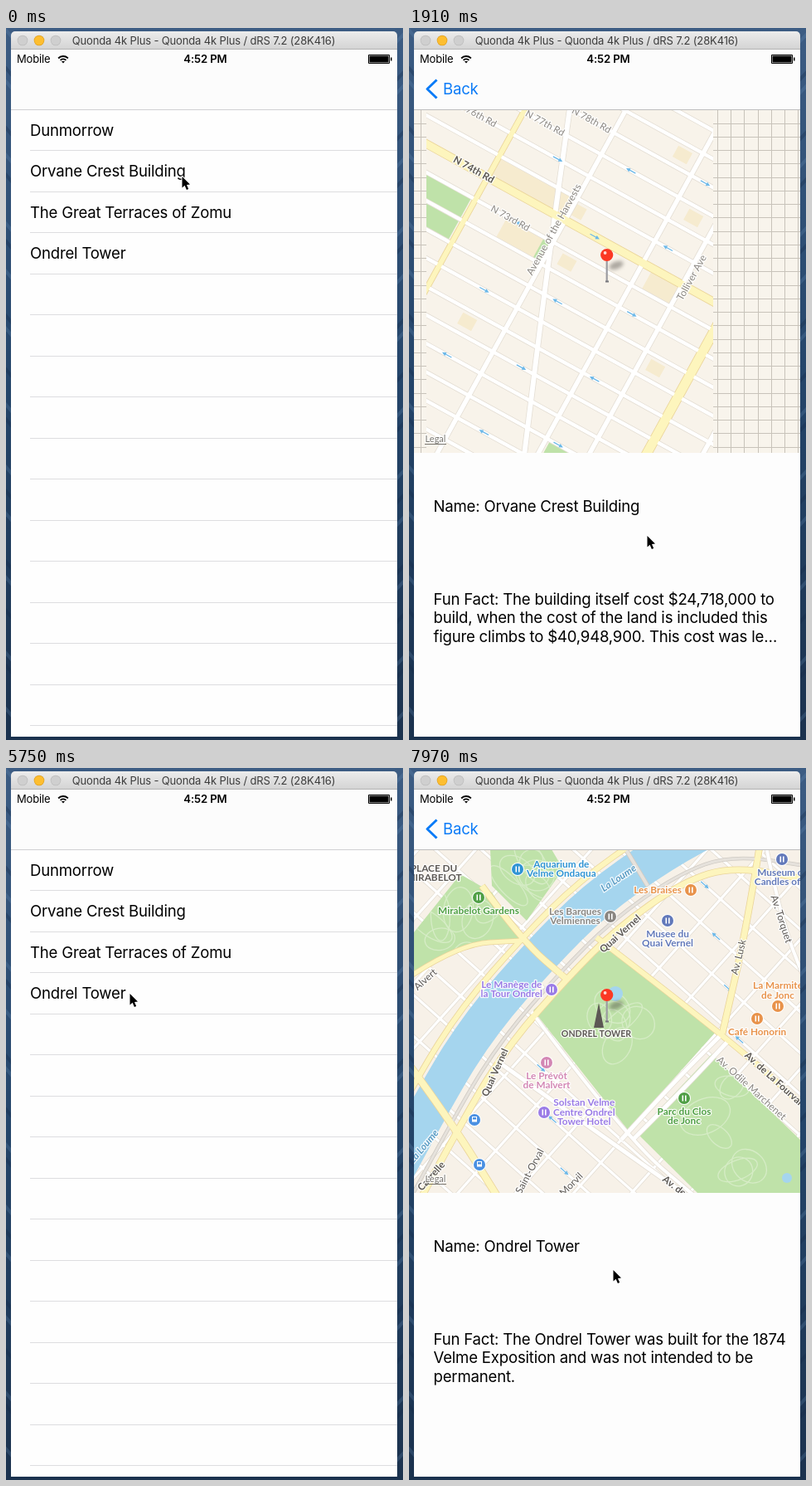
These frames come from a looping animation (479x858 px, 8 s). An HTML page with a canvas:

```html
<!DOCTYPE html>
<html lang="en">
<head>
<meta charset="utf-8">
<title>Places app</title>
<style>
html, body { margin: 0; width: 100%; height: 100%; overflow: hidden; background: #24405f; }
canvas { display: block; }
</style>
</head>
<body>
<canvas id="stage" width="479" height="858"></canvas>
<script>
const c = document.getElementById('stage').getContext('2d');
const LOOP = 8000, STEP = 147;
const L = 6, R = 472, W = R - L, NAV = 98, MAP_END = 512, BOTTOM = 854, ROW = 49.5;
const BLUE = '#0b7bf7', GREEN = '#bfe2a9', TAN = '#f6ebcf', DARK = '#5c5854', GRAY = '#8a8681';
const FOOD = '#e8924a', SHOP = '#e2a021', BAR = '#b672cf', HOTEL = '#9a7be6', MUSEUM = '#6279ba', PARK = '#4f9f45';

// start: step at which the first map tile arrives, pace: how slowly the rest follow
const places = [
  { name: 'Orvane Crest Building', grid: 16.25, draw: cityMap, start: 9, pace: 1,
    fact: ['The building itself cost $24,718,000 to', 'build, when the cost of the land is included this',
      'figure climbs to $40,948,900. This cost was le…'] },
  { name: 'Ondrel Tower', grid: 14.1, draw: riverMap, start: 48, pace: 0.3,
    fact: ['The Ondrel Tower was built for the 1874', 'Velme Exposition and was not intended to be', 'permanent.'] }
];
const rows = ['Dunmorrow', places[0].name, 'The Great Terraces of Zomu', places[1].name];

// ---------- drawing helpers ----------
let seed = 1;
const rand = (from, to) => {
  seed = seed * 16807 % 2147483647;
  return from + (to - from) * seed / 2147483647;
};

const rect = (color, x, y, w, h) => { c.fillStyle = color; c.fillRect(x, y, w, h); };

function circle(color, x, y, r) {
  c.fillStyle = color;
  c.beginPath();
  c.arc(x, y, r, 0, 7);
  c.fill();
}

function trace(p, smooth) {
  c.beginPath();
  c.moveTo(...p[0]);
  p.slice(1).forEach(([x, y], i) => {
    const next = p[i + 2];
    if (smooth && next) c.quadraticCurveTo(x, y, (x + next[0]) / 2, (y + next[1]) / 2);
    else c.lineTo(x, y);
  });
}

function poly(color, p) {
  trace(p);
  c.fillStyle = color;
  c.fill();
}

function line(color, width, p, smooth) {
  trace(p, smooth);
  c.strokeStyle = color;
  c.lineWidth = width;
  c.stroke();
}

const roadStyles = { white: ['#e4ded4', '#ffffff'], yellow: ['#ead49a', '#fdf5bd'], gray: ['#cfcac3', '#e6e2dc'] };
function roads(list) {
  for (const pass of [0, 1])
    for (const [kind, width, p] of list) line(roadStyles[kind][pass], width + (pass ? 0 : 1.6), p, true);
}

function ui(s, x, y, size = 18.6, color = '#000', align = 'left', weight = 400) {
  c.font = `${weight} ${size}px Inter, Roboto, sans-serif`;
  c.letterSpacing = `${-size * 0.011}px`;
  c.textAlign = align;
  c.fillStyle = color;
  c.fillText(s, x, y);
}

// Draws a haloed map label centred on a point and returns nothing.
function label(s, x, y, color = GRAY, angle = 0, font = '700 11.8px') {
  c.save();
  c.translate(x, y);
  c.rotate(angle * Math.PI / 180);
  c.font = font + ' Lato, "Open Sans", sans-serif';
  c.letterSpacing = '0px';
  c.textAlign = 'center';
  c.textBaseline = 'middle';
  c.strokeStyle = 'rgba(255,255,255,.85)';
  c.lineWidth = 2.6;
  c.strokeText(s, 0, 0);
  c.fillStyle = color;
  c.fillText(s, 0, 0);
  c.restore();
}

// A round badge with its name on one side of it.
function poi(color, s, x, y, side = 'below', glyph = true) {
  const lines = s.split('|'), n = lines.length, gap = 11.7;
  if (glyph) {
    circle('#fff', x, y, 8);
    circle(color, x, y, 7);
    rect('#fff', x - 2.5, y - 3.5, 1.6, 7);
    rect('#fff', x + 1, y - 3.5, 1.6, 7);
  }
  c.font = '700 11.8px Lato, "Open Sans", sans-serif';
  c.letterSpacing = '0px';
  const half = Math.max(...lines.map(t => c.measureText(t).width)) / 2 + 11;
  const tx = x + (side === 'right' ? half : side === 'left' ? -half : 0);
  const ty = side === 'below' ? y + 16 : side === 'above' ? y - 13 - (n - 1) * gap : y - (n - 1) * gap / 2;
  lines.forEach((t, i) => label(t, tx, ty + i * gap, color));
}

function transit(x, y) {
  circle('#fff', x, y, 8);
  circle('#4a90e2', x, y, 7);
  rect('#fff', x - 3, y - 4, 6, 6.5);
  rect('#4a90e2', x - 2, y - 3, 4, 2.5);
}

function arrow(x, y, angle) {
  c.save();
  c.translate(x, y);
  c.rotate(angle);
  line('#6cb8e8', 1.3, [[-6, 0], [5, 0]]);
  poly('#6cb8e8', [[2, -2.4], [7, 0], [2, 2.4]]);
  c.restore();
}

function landmark(s, x, y) {
  poly(DARK, [[x, y - 30], [x + 6, y], [x - 6, y]]);
  s.split('|').forEach((t, i) => label(t, x - 3, y + 8 + i * 11, DARK, 0, '700 10.6px'));
}

// ---------- city map: a slanted grid of numbered streets and avenues ----------
const SLOPE = 0.55, TILT = Math.atan(SLOPE);
const streetY = (k, x) => 128 + SLOPE * x + 34.4 * (34 - k);
const avenueX = (a, y) => a - SLOPE * (y - NAV);
function corner(k, a) {
  const x = (a - SLOPE * (streetY(k, 0) - NAV)) / (1 + SLOPE * SLOPE);
  return [x, streetY(k, x)];
}
const block = (color, k1, k2, a1, a2) =>
  poly(color, [corner(k1, a1), corner(k1, a2), corner(k2, a2), corner(k2, a1)]);

function cityMap(labelled) {
  rect('#f8f3ea', L, NAV, W, 414);
  block(TAN, 35, 34, 140, 262);
  block(TAN, 33, 32, 190, 262);
  block(TAN, 34, 33, 400, 446);
  for (let k = 28; k < 39; k += 2) {
    const a = rand(200, 480);
    block(TAN, k + 0.8, k + 0.3, a, a + 22);
  }
  block(GREEN, 33, 31, 20, 134);
  block(GREEN, 33, 32, 248, 258);
  block(GREEN, 26, 23, 390, 440);

  const street = (kind, w, k) => [kind, w, [[0, streetY(k, 0)], [480, streetY(k, 480)]]];
  const avenue = (kind, w, a) => [kind, w, [[avenueX(a, 90), 90], [avenueX(a, 520), 520]]];
  const list = [];
  for (let k = 20; k < 46; k++) list.push(street('white', 4.4, k));
  for (const a of [262, 384, 446, 583, 650]) list.push(avenue('white', 5.5, a));
  list.push(['white', 6, [[195, 90], [170, 265], [139, 515]]],
    street('yellow', 9, 34), avenue('yellow', 6, 140), avenue('yellow', 11, 515));
  roads(list);
  for (let k = 22; k < 44; k++) arrow(...corner(k, 200 + k * 97 % 290), TILT + (k % 2 ? Math.PI : 0));

  const along = (s, k, x, color = GRAY, font = '400 11.5px') => label(s, x, streetY(k, x), color, 29, font);
  const across = (s, a, y, color = DARK) => label(s, avenueX(a, y), y, color, -61, '400 12px');
  along('N 76th Rd', 36, 82);
  along('N 77th Rd', 37, 164);
  if (!labelled) {
    along('N 78th Rd', 38, 220);
    along('N 74th Rd', 34, 78, DARK, '700 12px');
    along('N 73rd Rd', 33, 122);
    across('Avenue of the Harvests', 255, 243, GRAY);
    across('Tolliver Ave', 453, 301, GRAY);
    return;
  }
  along('N 67th Rd', 27, 36);
  along('N 66th Rd', 26, 24);
  along('N 65th Rd', 25, 96);
  along('S 70th Rd', 30, 301);
  along('S 74th Rd', 34, 397, DARK, '700 12px');
  across('9th Ave', 138, 326);
  across('Ave N', 520, 503);
  across('Corbin', 585, 432);
  label('Longmere', 149, 434, DARK, -82, '700 12px');

  poi(FOOD, 'Plum Ladle|and Kettle', 80, 126, 'left');
  poi(FOOD, 'Bramble Cafe', 140, 148, 'right');
  poi(BAR, 'Tinderly Rooftop', 265, 124, 'right');
  poi(SHOP, 'Olmby', 56, 174, 'right');
  poi(HOTEL, 'Varnley Court|Inn East 88th|Corner', 218, 207, 'above');
  poi(SHOP, 'Finch & Harrow', 331, 159);
  poi(SHOP, "Wembo's", 173, 213);
  poi(SHOP, 'Nilu', 222, 244);
  poi(SHOP, 'Tamberton Mall', 137, 257, 'left');
  poi(FOOD, 'The Thimble Jar', 347, 237, 'left');
  poi(MUSEUM, 'Hollin Library|Museum', 377, 249);
  poi(FOOD, "Osterby's", 88, 298);
  poi(HOTEL, 'Calenti, a|Brimwell Hotel', 111, 338);
  poi(BAR, 'Trellisa', 125, 415, 'left');
  poi(FOOD, 'Copperbox Room', 100, 448, 'left');
  poi(FOOD, 'NamiSoro', 268, 368);
  poi(FOOD, 'Belda', 281, 448);
  poi(MUSEUM, 'Museum of Ink', 196, 470);
  poi(SHOP, 'Wicket Lane|Market', 372, 467);
  poi(DARK, 'LOW|ORE|FEN', 17, 199, 'below', false);
  transit(79, 206);
  transit(167, 257);
  label('M E R R O W T O W N', 223, 345, GRAY, 0, '400 12px');
  landmark('ORVANE CREST|BUILDING', 251, 302);
}

// ---------- river map: quays follow the river, streets form a turned grid ----------
const spine = [[-50, 520], [22, 385], [78, 297], [150, 215], [215, 150], [300, 90], [380, 48], [500, 52]];

// The river line moved sideways; roads leave the bank a little past the bend.
function beside(d, spread = 0) {
  return spine.map(([x, y], i) => {
    const [ax, ay] = spine[Math.max(0, i - 1)], [bx, by] = spine[Math.min(spine.length - 1, i + 1)];
    const len = Math.hypot(bx - ax, by - ay), far = d + Math.max(0, i - 5) * spread;
    return [x - (by - ay) / len * far, y + (bx - ax) / len * far];
  });
}

function park(p) {
  poly(GREEN, p);
  c.save();
  c.clip();
  for (let i = 0; i < 7; i++) {
    const [x, y] = p[i % p.length], [mx, my] = p[(i + 2) % p.length], t = rand(0.2, 0.6);
    c.beginPath();
    c.ellipse(x + (mx - x) * t, y + (my - y) * t, rand(12, 34), rand(10, 22), rand(0, 3), 0, 7);
    c.strokeStyle = '#d6ecc6';
    c.lineWidth = 1.3;
    c.stroke();
  }
  c.restore();
}

function riverMap(labelled) {
  rect('#f7f1e8', L, NAV, W, 414);
  const turn = 0.73, cos = Math.cos(turn), sin = Math.sin(turn);
  const at = (u, v) => [256 + u * cos - v * sin, 448 + u * sin + v * cos];
  const streets = [];
  for (let i = -12; i < 13; i++) {
    streets.push(['white', 3.2, [at(-500, i * 37), at(500, i * 37)]]);
    streets.push(['white', 3.2, [at(i * 52, -500), at(i * 52, 500)]]);
  }
  roads(streets);
  for (let i = 0; i < 12; i++) arrow(...at(i % 4 * 52 - 130, (i - 8) * 37), turn + (i % 2 ? Math.PI : 0));

  park([[6, 198], [62, 128], [100, 150], [136, 206], [66, 214], [6, 245]]);
  park([[98, 98], [172, 98], [186, 122], [142, 184], [100, 142]]);
  park([[150, 292], [236, 213], [370, 318], [264, 436]]);
  park([[365, 345], [472, 448], [472, 512], [348, 512], [275, 440]]);
  line('#a5d5ee', 46, beside(13), true);
  circle('#a5d5ee', 249, 272, 9);
  circle('#a5d5ee', 456, 494, 6);

  roads([
    ['gray', 4, [[258, 92], [288, 142]]],
    ['gray', 3, beside(45, 12)],
    ['white', 5, [[105, 352], [200, 420], [345, 522]]],
    ['white', 5, [[256, 448], [318, 380], [378, 320]]],
    ['white', 5, [[270, 448], [330, 388], [386, 328]]],
    ['white', 4, [[148, 294], [262, 446], [352, 522]]],
    ['white', 4, [[430, 90], [448, 180], [480, 262]]],
    ['yellow', 6, beside(-17)],
    ['yellow', 5, [[0, 252], [60, 212], [136, 208]]],
    ['yellow', 7, [[88, 142], [136, 208], [192, 256]]],
    ['yellow', 8, [[-4, 352], [50, 425], [112, 525]]],
    ['yellow', 7, beside(56, 15)],
    ['yellow', 6, [[226, 204], [378, 320], [485, 415]]],
    ['yellow', 7, [[424, 88], [408, 190], [378, 320]]]
  ]);
  if (!labelled) return;

  const italic = 'italic 700 12px', thin = '400 12px', water = '#5a9cc4';
  poi(DARK, 'PLACE DU|MIRABELOT', 30, 105, 'below', false);
  poi('#2f94d4', 'Aquarium de|Velme Ondaqua', 131, 122, 'right');
  poi(PARK, 'Mirabelot Gardens', 84, 156);
  poi(GRAY, 'Les Barques|Velmiennes', 243, 179, 'left');
  poi(FOOD, 'Les Braises', 340, 147, 'left');
  poi(MUSEUM, 'Museum of|Candles of V', 450, 110);
  poi(MUSEUM, 'Musee du|Quai Vernel', 312, 184);
  poi(HOTEL, 'Le Manège de|la Tour Ondrel', 172, 267, 'left');
  poi(FOOD, 'La Marmite|de Jonc', 445, 287, 'above');
  poi(FOOD, 'Café Honorin', 420, 302);
  poi('#d387b4', 'Le Prévôt|de Malvert', 166, 355);
  poi(HOTEL, 'Solstan Velme|Centre Ondrel|Tower Hotel', 163, 415, 'right');
  poi(PARK, 'Parc du Clos|de Jonc', 332, 398);
  label('La Loume', 253, 133, water, -34, italic);
  label('La Loume', 18, 456, water, -50, italic);
  label('Quai Vernel', 255, 200, DARK, -42);
  label('Quai Vernel', 104, 367, DARK, -66);
  label('Av. Torquet', 449, 182, DARK, 72, thin);
  label('Av. Lusk', 398, 228, DARK, -76, thin);
  label('Av. de La Fourvanne', 446, 380, DARK, 42);
  label('Av. Odile Marchenet', 413, 386, GRAY, 42, thin);
  label('Av. de', 320, 504, DARK, 38);
  label('Saint-Orval', 146, 486, DARK, -62, thin);
  label('Morvil', 196, 502, DARK, -45, thin);
  label('Cavrelle', 27, 492, DARK, -48);
  label('Alvert', 20, 255, DARK, -42, thin);
  transit(79, 424);
  transit(85, 478);
  landmark('ONDREL TOWER', 229, 313);
}

// ---------- app screens ----------
function desktop() {
  const g = c.createLinearGradient(0, 0, 0, 858);
  g.addColorStop(0, '#3c5c83');
  g.addColorStop(0.5, '#24456a');
  g.addColorStop(1, '#1b324e');
  rect(g, 0, 0, 479, 858);
  for (let i = 0; i < 24; i++) {
    const y = i * 37 + Math.sin(i * 2.3) * 12;
    const shade = i % 2 ? 'rgba(20,40,70,.3)' : 'rgba(110,150,190,.22)';
    line(shade, 4, [[-2, y], [8, y + 12]]);
    line(shade, 4, [[470, y + 18], [481, y + 6]]);
  }
}

function windowBar() {
  const g = c.createLinearGradient(0, 4, 0, 26);
  g.addColorStop(0, '#ececec');
  g.addColorStop(1, '#d3d3d3');
  c.fillStyle = g;
  c.beginPath();
  c.roundRect(L, 4, W, 22, [5, 5, 0, 0]);
  c.fill();
  rect('#b3b3b3', L, 25, W, 1);
  [['#bcbcbc', '#cfcfcf'], ['#dfa023', '#fdbe30'], ['#bcbcbc', '#cfcfcf']].forEach(([rim, fill], i) => {
    circle(rim, 20 + i * 20, 15, 6.3);
    circle(fill, 20 + i * 20, 15, 5.6);
  });
  ui('Quonda 4k Plus - Quonda 4k Plus / dRS 7.2 (28K416)', 238.5, 20, 13, '#3c3c3c', 'center');
}

function navBar(s) {
  rect('#fcfcfc', L, 26, W, 72);
  rect(s > 0.5 ? '#bdbdbd' : '#d0d0d3', L, NAV, W, 1);
  ui('Mobile', 13, 42, 13);
  ui('4:52 PM', 240.5, 42, 13.2, '#000', 'center', 600);
  c.strokeStyle = '#000';
  c.lineWidth = 1.9;
  for (const r of [4.6, 8]) {
    c.beginPath();
    c.arc(69, 42, r, -Math.PI * 0.76, -Math.PI * 0.24);
    c.stroke();
  }
  poly('#000', [[69, 42.5], [66.9, 40], [71.1, 40]]);
  c.lineWidth = 1;
  c.strokeRect(437.5, 32.5, 25, 10);
  rect('#000', 438.5, 33.5, 23, 8);
  rect('#000', 464, 35.5, 1.5, 4);

  const p = 1 - s;
  c.globalAlpha = Math.max(0, 1 - 6 * p);
  line(BLUE, 3, [[33.5, 62.5], [22, 73.5], [33.5, 84.5]]);
  c.globalAlpha = Math.max(0, 1 - 2.2 * p);
  ui('Back', 41 + p * 110, 80, 18.6, BLUE);
  c.globalAlpha = 1;
}

function listScreen(s, selected, glow) {
  c.save();
  c.translate(-0.3 * W * s, 0);
  rect('#fefefe', L, NAV, W, BOTTOM - NAV);
  if (glow > 0) rect(`rgba(217,217,217,${glow})`, L, NAV + ROW * selected, W, ROW);
  for (let i = 1; i < 16; i++) rect('#dddde0', 29, Math.floor(NAV + ROW * i), R - 29, 1);
  rows.forEach((t, i) => ui(t, 29, 129.5 + ROW * i));
  c.restore();
  rect(`rgba(0,0,0,${0.1 * s})`, L, NAV, W, BOTTOM - NAV);
}

function pin() {
  c.save();
  c.filter = 'blur(2px)';
  c.fillStyle = 'rgba(70,65,60,.42)';
  c.beginPath();
  c.ellipse(250, 286, 9, 4.5, -0.35, 0, 7);
  c.fill();
  c.restore();
  line('#9b9ba1', 2.2, [[238.7, 279], [238.7, 306]]);
  rect('#77777c', 237, 304.5, 4, 2);
  circle('#fb3823', 238.7, 273.5, 7.6);
  circle('#ffd9d2', 236.6, 271, 1.9);
}

// Clips to the map tiles that have arrived: middle column first, then right, then left.
function clipTiles({ start, pace }, n) {
  const size = 346, left = 21, top = 336 - size;
  c.beginPath();
  for (const [col, wait] of [[0, 0], [1, 8], [-1, 12]])
    for (const row of [0, 1])
      if (n >= start + pace * (wait + 4 * row)) c.rect(left + col * size, top + row * size, size, size);
  c.clip();
}

function detailScreen(s, place, n) {
  const x = W * (1 - s), { grid } = place;
  c.save();
  c.translate(x, 0);
  if (x > 1) {
    const g = c.createLinearGradient(L - 8, 0, L, 0);
    g.addColorStop(0, 'rgba(0,0,0,0)');
    g.addColorStop(1, 'rgba(0,0,0,.14)');
    rect(g, L - 8, NAV, 8, BOTTOM - NAV);
  }
  rect('#fdfdfd', L, NAV, W, BOTTOM - NAV);

  c.save();
  c.beginPath();
  c.rect(L, NAV, W, MAP_END - NAV);
  c.clip();
  rect('#f8f4ec', L, NAV, W, MAP_END - NAV);
  // the placeholder grid is centred near the pin
  for (let i = -20; i < 20; i++) {
    rect('#c8c3ba', Math.floor(239 + (i + 0.2 * (grid > 15)) * grid), NAV, 1, MAP_END);
    rect('#c8c3ba', L, Math.floor(310 + (i + 0.1 * (grid < 15)) * grid), W, 1);
  }
  clipTiles(place, n);
  seed = 7;
  if (n >= place.start) place.draw(n >= place.start + 15 * place.pace);
  c.restore();

  label('Legal', 32, 496, '#77746e', 0, '400 11px');
  rect('#77746e', 19, 501, 26, 1);
  pin();
  ui('Name: ' + place.name, 29.5, 583);
  place.fact.forEach((t, i) => ui((i ? '' : 'Fun Fact: ') + t, 29.5, 694.5 + i * 22.7));
  c.restore();
}

// ---------- motion ----------
const clamp = v => Math.min(1, Math.max(0, v));
const ease = u => u * u * (3 - 2 * u);

function spring(ms) {
  const x = Math.max(0, ms) * 0.017;
  const v = 1 - (1 + x) * Math.exp(-x);
  return v > 0.999 ? 1 : v;
}

// each move: begin, end, and where the pointer comes to rest
const moves = [[1100, 1911, 287, 612], [2060, 2793, 149, 114], [3528, 3969, 65, 78],
  [4557, 5586, 149, 272], [6909, 7938, 246, 605]];

function cursor(t) {
  let x = 212, y = 179;
  for (const [begin, end, toX, toY] of moves) {
    const e = ease(clamp((t - begin) / (end - begin)));
    x += (toX - x) * e;
    y += (toY - y) * e;
  }
  c.save();
  c.translate(x, y);
  trace([[0.5, 0], [0.5, 13.5], [3.6, 10.8], [5.9, 16], [8.2, 15], [6, 10], [10, 9.6]]);
  c.closePath();
  c.strokeStyle = '#fff';
  c.lineWidth = 2;
  c.stroke();
  c.fillStyle = '#000';
  c.fill();
  c.restore();
}

function draw(n) {
  const t = n * STEP, second = t > 5400;
  const s = t < 4000 ? spring(t - 235) : second ? spring(t - 5935) : 1 - spring(t - 4225);
  const glow = second ? +(t >= 5880) : t < STEP ? 0 : clamp(1 - (t - 4600) / 350);
  desktop();
  windowBar();
  c.save();
  c.beginPath();
  c.rect(L, 26, W, BOTTOM - 26);
  c.clip();
  if (s < 1) listScreen(s, second ? 3 : 1, glow);
  if (s > 0) detailScreen(s, places[+second], n);
  navBar(s);
  c.restore();
  cursor(t);
}

c.lineJoin = 'round';
let shown = -1;
function tick(now) {
  // the screen refreshes in even steps
  const n = Math.min(54, Math.floor(now % LOOP / STEP));
  if (n !== shown) draw(shown = n);
  requestAnimationFrame(tick);
}
tick(performance.now());
</script>
</body>
</html>
```
